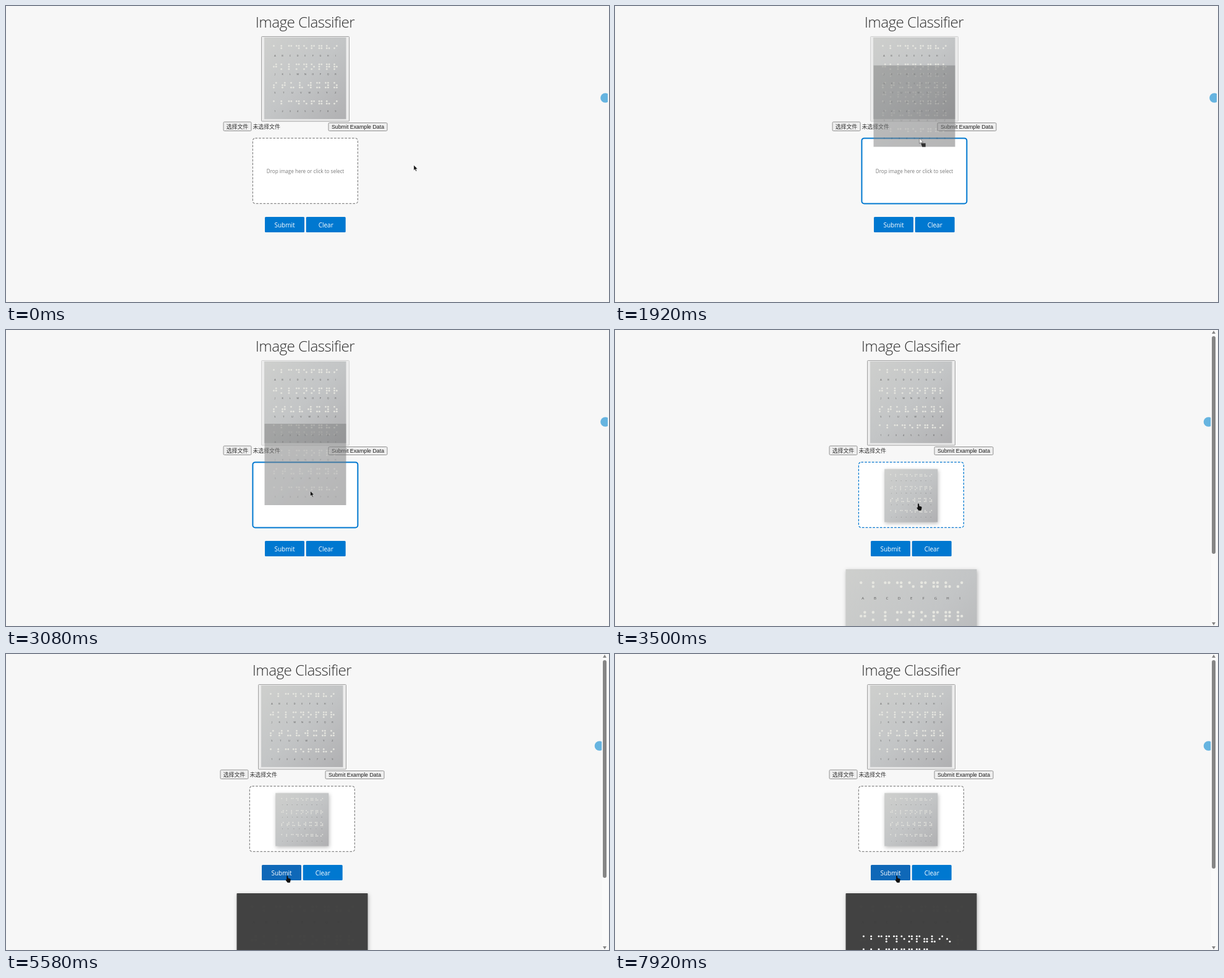
Recreate the animation shown at these times as an HTML page. Size 976x480 px, loop 8000 ms.

```html
<!DOCTYPE html>
<html lang="en">
<head>
<meta charset="utf-8">
<title>Image Classifier</title>
<style>
  html, body { margin: 0; width: 100%; height: 100%; overflow: hidden; background: #f7f7f7; }
  svg { display: block; width: 976px; height: 480px; }
  text { font-family: "Open Sans", "Noto Sans", sans-serif; }
  .middle { text-anchor: middle; }
  .native { font-family: "Liberation Sans", sans-serif; font-size: 8.8px; fill: #1c1c1c; }
  .cjk { font-family: "Noto Sans CJK SC", "Noto Sans CJK", sans-serif; font-size: 8.9px; fill: #303030; }
  .control { fill: #efefef; stroke: #909090; }
  .shadow { filter: drop-shadow(1px 2px 3px #0004); }
  #ghost { opacity: .52; filter: brightness(.65); }
</style>
</head>
<body>
<svg id="stage" viewBox="0 0 976 480"></svg>
<script>
const stage = document.getElementById('stage');

// Six-dot cells: the low bits of a Braille code point are its dots, column by column.
function braille(text, x, y, pitch, gap, radius) {
  let dots = '';
  [...text].forEach((cell, i) => {
    for (let bit = 0; bit < 6; bit++) {
      if (!(cell.codePointAt(0) >> bit & 1)) continue;
      const cx = x + i * pitch + (bit < 3 ? -.5 : .5) * gap;
      const cy = y + (bit % 3 - 1) * gap;
      dots += `<circle cx="${cx.toFixed(2)}" cy="${cy.toFixed(2)}" r="${radius}"/>`;
    }
  });
  return dots;
}

const chart = [
  ['ABCDEFGHI', '⠁⠃⠉⠙⠑⠋⠛⠓⠊'],
  ['JKLMNOPQR', '⠚⠅⠇⠍⠝⠕⠏⠟⠗'],
  ['STUVWXYZ', '⠎⠞⠥⠧⠺⠭⠽⠵'],
  ['123456789', '⠁⠃⠉⠙⠑⠋⠛⠓⠊']
].map(([labels, cells], row) => {
  const pitch = 74 / (labels.length - 1), y = 13.2 + row * 22.6;
  const captions = [...labels].map((label, i) =>
    `<text class="middle" x="${13.1 + i * pitch}" y="${y + 10}" font-size="2.9" fill="#555">${label}</text>`);
  return `<g fill="#e6e6e0">${braille(cells, 13.1, y, pitch, 2.9, 1.05)}</g>${captions.join('')}`;
}).join('');

const picture = (x, y, size) =>
  `<use href="#chart" transform="translate(${x} ${y}) scale(${size / 100})"/>`;

const button = (id, x, label) => `
  <rect id="${id}" x="${x}" y="342" width="64" height="25" rx="1.5" fill="#0078d0"/>
  <text class="middle" x="${x + 32}" y="359" font-size="10" fill="#fff">${label}</text>`;

stage.innerHTML = `
  <defs>
    <linearGradient id="paper" x2="1" y2="1">
      <stop stop-color="#cecfcd"/><stop offset=".5" stop-color="#c3c5c6"/><stop offset="1" stop-color="#b0b0b2"/>
    </linearGradient>
    <g id="chart"><rect width="100" height="100" fill="url(#paper)"/>${chart}</g>
    <clipPath id="page"><rect id="pageArea" width="974" height="480"/></clipPath>
  </defs>
  <rect width="976" height="480" fill="#f7f7f7"/>

  <g id="content">
    <text class="middle" x="484" y="35" font-size="24.3" font-weight="300" letter-spacing="-.6" fill="#303030">Image Classifier</text>
    <rect id="frame" x="413.5" y="49.5" width="142" height="137.5" rx="1" fill="#ececec"/>
    ${picture(418, 51, 132.5)}
    <rect class="control" x="352" y="188" width="45" height="14.5" rx="1.5"/>
    <text class="cjk" x="356.7" y="199">选择文件</text>
    <text class="cjk" x="399.5" y="199">未选择文件</text>
    <rect class="control" x="522" y="189.5" width="95" height="13" rx="1.5"/>
    <text class="native middle" x="569.5" y="199">Submit Example Data</text>

    <rect id="zone" x="399.4" y="214.4" width="170" height="106" rx="4" fill="#fff"/>
    <text id="hint" class="middle" x="484.5" y="270.5" font-size="8.1" fill="#7a7a7a">Drop image here or click to select</text>
    ${button('submit', 419, 'Submit')}
    ${button('clear', 485.7, 'Clear')}

    <g id="previews">
      <g class="shadow">${picture(441.2, 225.5, 86)}</g>
      <g class="shadow">${picture(378.5, 388, 212)}</g>
      <rect id="dim" x="378.5" y="388" width="212" height="212" rx="1" fill="#3c3c3c" opacity=".95"/>
      <g id="result" fill="#fff">
        ${braille('⠁⠃⠉⠏⠹⠑⠝⠏⠶⠧⠊⠢', 409.5, 462, 12.3, 4.3, 1.5)}
        ${braille('⠁⠃⠇⠛⠛⠛⠛⠛⠛', 409.5, 483, 12.3, 4.3, 1.5)}
      </g>
    </g>
  </g>

  <g id="ghost">${picture(418.5, 0, 132)}</g>

  <g clip-path="url(#page)"><circle id="badge" cx="970" cy="149" r="7.8" fill="#66b4e0"/></g>
  <g id="scrollbar" fill="#868686">
    <rect x="964.5" width="10" height="480" fill="#fafafa"/>
    <rect id="thumb" x="966" y="10" width="6" rx="3"/>
    <path d="M966 6h6l-3-5zM966 474h6l-3 5z"/>
  </g>

  <g id="cursor">
    <path id="arrow" d="M0 0V8.6L2 6.8 3.4 10 4.9 9.4 3.5 6.3H6.2Z" stroke-width=".5"/>
    <path id="copyMark" d="M2.5 8H10V14H4.5Z" fill="#303030"/>
    <path id="hand" d="M.6 1Q1.7-.4 2.4 1.3L3 4.6 6.4 5.6Q7.4 6 7 7.8L6 11.8H2L-.8 8Q-1.6 6.4.6 6.8Z" fill="#111"/>
  </g>`;

const el = Object.fromEntries([...stage.querySelectorAll('[id]')].map(node => [node.id, node]));
const set = (node, attributes) => {
  for (const name in attributes) node.setAttribute(name, attributes[name]);
};
const show = (node, visible) => set(node, { display: visible ? 'inline' : 'none' });

// Eased interpolation through [time, ...values] keys.
function at(keys, t) {
  const next = keys.findIndex(key => key[0] > t);
  if (next < 0) return keys[keys.length - 1].slice(1);
  const a = keys[next - 1], b = keys[next];
  const k = (t - a[0]) / (b[0] - a[0]), eased = k * k * (3 - 2 * k);
  return a.slice(1).map((value, i) => value + (b[i + 1] - value) * eased);
}

const LOOP = 8000, STEP = 1000 / 12;
const DRAG = 1160, ENTER = 2080, DROP = 3245, CLICK = 5080, RESULT = 7410;
const GRIP = 109;
const cursorPath = [
  [0, 660, 258], [83, 637, 240], [167, 637, 240], [600, 405, 32], [1000, 492, 160],
  [1250, 492, 160], [2330, 493, 241], [2670, 493, 413], [3000, 492.5, 261], [3083, 492.5, 261],
  [3500, 489.5, 281], [3660, 489.5, 281], [4660, 453.5, 359], [8000, 454.5, 359]
];

function draw(t) {
  const [x, y] = at(cursorPath, t);
  const dragging = t >= DRAG && t < DROP;
  const dropped = t >= DROP;
  const inside = y > 214 && y < 321;
  const over = dragging && inside;
  const inZone = dropped && inside;
  const onSubmit = dropped && y > 342;
  const pointing = inZone || onSubmit;

  set(el.content, { transform: `translate(${dropped ? -5 : 0} 0)` });
  set(el.frame, { stroke: dragging ? '#d0d0d0' : '#a0a0a0' });
  set(el.zone, {
    stroke: over || inZone ? '#0078d0' : '#888',
    'stroke-width': over ? 2 : 1.2,
    'stroke-dasharray': over ? 'none' : '3.6 2.2'
  });
  set(el.hint, { opacity: dropped ? 0 : 1 - Math.min(1, Math.max(0, (t - ENTER) / 330)) });
  set(el.submit, { fill: onSubmit ? '#0f68b8' : '#0078d0' });

  show(el.previews, dropped);
  show(el.dim, t >= CLICK);
  show(el.result, t >= RESULT);

  // The dragged copy trails the pointer by one step.
  const trail = at(cursorPath, Math.max(1000, t - STEP))[1];
  show(el.ghost, dragging);
  set(el.ghost, { transform: `translate(0 ${trail - GRIP})` });

  show(el.scrollbar, dropped);
  set(el.thumb, { height: t >= RESULT ? 338 : 353 });
  set(el.badge, { cx: dropped ? 960.5 : 970 });
  set(el.pageArea, { width: dropped ? 964.5 : 974 });

  const copying = over && t < 2900;
  set(el.cursor, { transform: `translate(${x} ${y})` });
  set(el.arrow, { fill: copying ? '#fff' : '#111', stroke: copying ? '#303030' : '#fff' });
  show(el.arrow, !pointing);
  show(el.copyMark, copying);
  show(el.hand, pointing);
}

function tick() {
  const t = performance.now() % LOOP;
  draw(Math.floor((t + 4) / STEP) * STEP % LOOP);
  requestAnimationFrame(tick);
}
tick();
</script>
</body>
</html>
```
